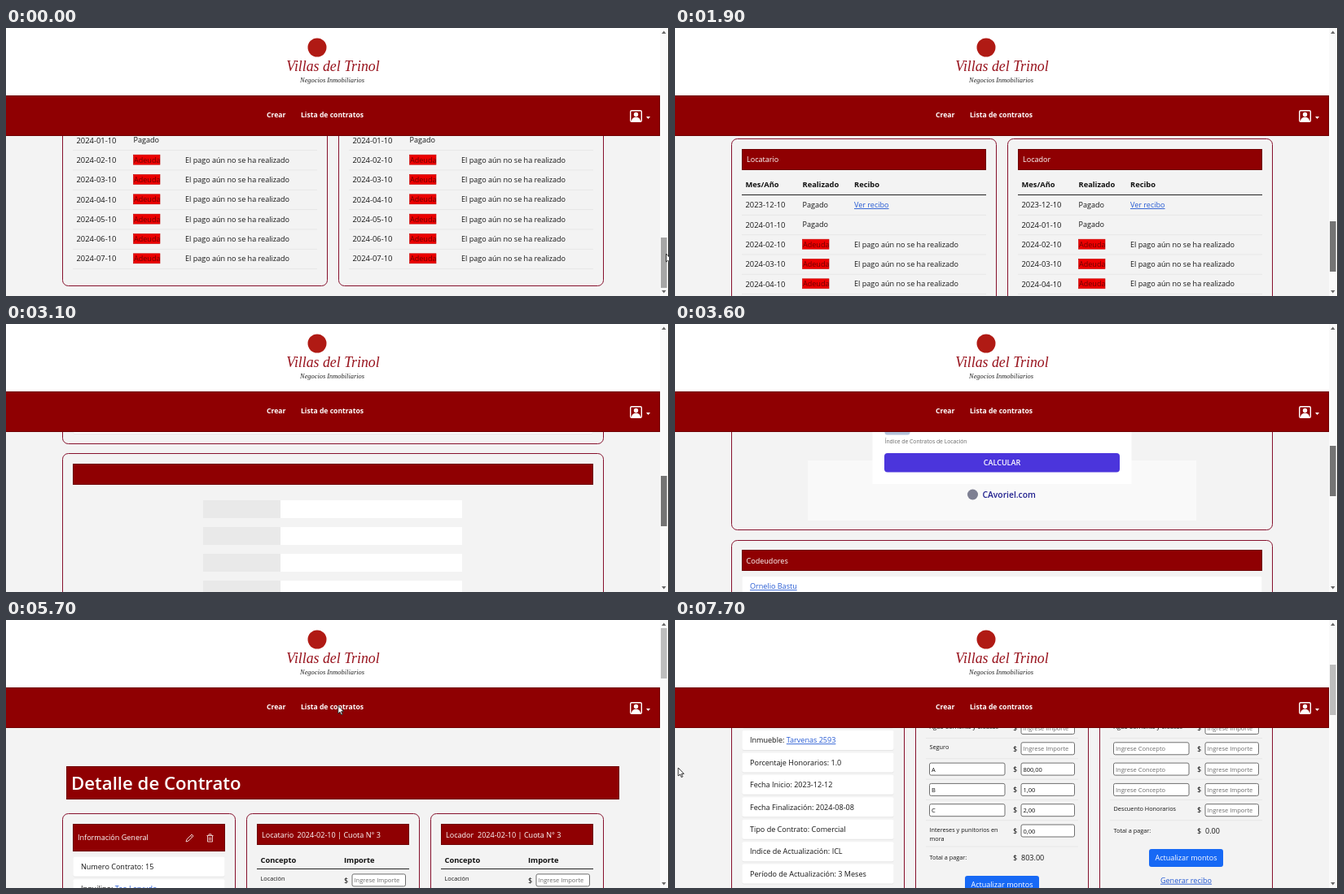
An HTML page that plays this animation: 814 by 330 pixels, repeating every 8 s.

```html
<!DOCTYPE html>
<html lang="es">
<head>
<meta charset="utf-8">
<title>Detalle de Contrato</title>
<style>
  html, body { margin: 0; width: 100%; height: 100%; overflow: hidden; background: #f3f3f3; }
  svg { display: block; font-family: "Open Sans", "Noto Sans", sans-serif; }
  .link { fill: #2459d3; text-decoration: underline; }
  .logo { font-family: "Liberation Serif", serif; font-style: italic; }
</style>
</head>
<body>
<svg id="stage" width="814" height="330" viewBox="0 0 814 330"></svg>
<script>
const RED = '#8f0002', INK = '#151515', BLUE = '#1769f5', GREY = '#6c6c6c';
const LOOP = 8000, STEP = 100, SCROLL_PER_THUMB_PX = 5.33;

// Drawing helpers; the y of a text is its visual middle.
const rect = (x, y, w, h, fill, extra = '') =>
  `<rect x="${x}" y="${y}" width="${w}" height="${h}" fill="${fill}" ${extra}/>`;
const text = (s, x, y, { size = 9.05, fill = INK, weight = 400, anchor = 'start', cls = '' } = {}) =>
  `<text x="${x}" y="${y + size * 0.36}" font-size="${size}" fill="${fill}" font-weight="${weight}" text-anchor="${anchor}" class="${cls}">${s}</text>`;
const white = (s, x, y, o = {}) => text(s, x, y, { fill: '#fff', ...o });
const link = (s, x, y, o = {}) => text(s, x, y, { cls: 'link', ...o });
const bold = (s, x, y) => text(s, x, y, { size: 9.3, weight: 700, fill: '#111' });
const small = (s, x, y) => text(s, x, y, { size: 7.3 });
const anchor = s => `<tspan class="link">${s}</tspan>`;
const card = (x, y, w, h) => rect(x, y, w, h, 'none', 'rx="7" stroke="#86102c"');
const bar = (x, y, w, h) => rect(x + 0.5, y + 0.5, w - 1, h - 1, RED, 'stroke="#6e0002"');
const rule = (x, y, w, fill = '#e7e7e7') => rect(x, y, w, 1, fill);
const item = (x, y, w) =>
  rect(x, y - 11, w, 24, '#e6e6e6', 'rx="2"') + rect(x, y - 12, w, 24, '#fff', 'rx="2"');

function field(x, y, w, value, hint) {
  return rect(x, y - 7.5, w, 15, '#fff', 'rx="2" stroke="#6f6f6f"') +
    text(value || hint, x + 2.5, y + 0.3, { size: 7.5, fill: value ? '#111' : GREY });
}

function infoCard() {
  const lines = [
    'Numero Contrato: 15',
    'Inquilino: ' + anchor('Teo Larvudo'),
    'Propietario: ' + anchor('Evaristo Molvez'),
    'Inmueble: ' + anchor('Tarvenas 2593'),
    'Porcentaje Honorarios: 1.0',
    'Fecha Inicio: 2023-12-12',
    'Fecha Finalización: 2024-08-08',
    'Tipo de Contrato: Comercial',
    'Indice de Actualización: ICL',
    'Período de Actualización: 3 Meses'
  ];
  const icons = `<g fill="none" stroke="#f3dede" stroke-width=".9">
    <path d="M221 273l1-3 6-6 2 2-6 6zM226.500 265.500l2 2"/>
    <path d="M246.500 265.500h8M249 265v-1.200h3V265M247.500 266v7h6v-7M249.500 267.500v4M251.500 267.500v4"/></g>`;
  return card(69.5, 238.5, 212, 380) + bar(82, 251, 187, 34) +
    white('Información General', 88, 268) + icons +
    lines.map((s, i) => {
      const y = 303.7 + i * 27.43;
      return item(82.5, y, 186) + text(s, 92, y);
    }).join('');
}

// A row is [label or null for an input, concept value, amount value].
function quotaCard(x, title, dateX, rows, totalY, total) {
  const conceptX = x + 17, dollarX = x + 119.5, amountX = x + 129.5;
  let out = card(x, 238.5, 212, 380) + bar(x + 12.5, 251, 187, 26) +
    white(title, x + 18.5, 264.3) + white('2024-02-10 | Cuota N° 3', dateX, 264.3) +
    bold('Concepto', conceptX, 295.3) + bold('Importe', dollarX, 295.3) +
    rule(x + 12.5, 306, 187, '#222');
  rows.forEach(([label, concept, amount], i) => {
    const y = 320.4 + i * 25.3;
    if (label) {
      label.split('\n').forEach((s, k) => out += small(s, conceptX, y - 1.6 + k * 11.5));
    } else {
      out += field(conceptX, y, 92.5, concept, 'Ingrese Concepto');
    }
    out += text('$', dollarX, y) + field(amountX, y, 65.5, amount, 'Ingrese Importe');
    out += rule(x + 12.5, y + (label && label.includes('\n') ? 19 : 12), 187);
  });
  const mid = x + 106;
  return out + small('Total a pagar:', conceptX, totalY) +
    text('$', dollarX, totalY) + text(total, amountX, totalY) +
    rect(mid - 45.5, totalY + 22.5, 91, 22, BLUE, 'rx="3"') +
    white('Actualizar montos', mid, totalY + 33.5, { anchor: 'middle' }) +
    link('Generar recibo', mid, totalY + 61, { anchor: 'middle' });
}

function calculator() {
  return card(69.5, 631.5, 664, 368) + bar(82, 644, 639, 26) +
    rect(163, 914, 477, 74, '#f9f9f9') + rect(242.5, 690, 318, 253, '#fff') +
    rect(257.5, 860, 31, 22.5, '#b3c2da', 'rx="3"') +
    text('Índice de Contratos de Locación', 257.5, 891, { size: 6.8, fill: '#666' }) +
    rect(257, 905, 289, 23.5, '#4b35dc', 'rx="4"') +
    white('CALCULAR', 401.5, 917, { weight: 600, anchor: 'middle' }) +
    '<circle cx="365.500" cy="956" r="6.500" fill="#7d7f92"/>' +
    text('CAvoriel.com', 377.5, 956, { size: 10.3, weight: 600, fill: '#20208f' });
}

function guarantors() {
  return card(69.5, 1012.5, 664, 81) + bar(82, 1024, 639, 26) +
    white('Codeudores', 87.5, 1037.5) + item(82.5, 1069, 638) +
    link('Ornelio Bastu', 92, 1069);
}

function saveForm() {
  let out = card(69.5, 1105.5, 664, 218) + bar(82, 1118, 639, 26);
  for (let y = 1163; y < 1280; y += 33) {
    out += rect(242, y, 95, 22, '#e9e9e9') + rect(337, y, 223, 22, '#fff');
  }
  return out + rect(337.5, 1290.5, 127.5, 17.5, BLUE, 'stroke="#1b4a9c"') +
    white('Guardar', 401.5, 1299.3, { anchor: 'middle' });
}

function payments(dx, title) {
  const dates = ['2023-12', '2024-01', '2024-02', '2024-03', '2024-04', '2024-05', '2024-06', '2024-07'];
  let out = card(69.5, 1352.5, 325, 285) + bar(82, 1365, 300, 26) +
    white(title, 88, 1378) + bold('Mes/Año', 86.5, 1409) + bold('Realizado', 156.5, 1409) +
    bold('Recibo', 220, 1409) + rule(82, 1421, 300, '#222');
  dates.forEach((month, i) => {
    const y = 1433.8 + i * 24.33;
    out += text(month + '-10', 86.5, y, { size: 9.4 }) + rule(82, y + 12, 300);
    if (i < 2) {
      out += text('Pagado', 156.5, y);
    } else {
      out += rect(156.5, y - 6.3, 32.5, 12, '#ec0000', 'stroke="#c40000" stroke-width=".6"') +
        text('Adeuda', 157, y, { fill: '#700000' }) +
        text('El pago aún no se ha realizado', 220, y);
    }
    if (i === 0) out += link('Ver recibo', 220, y);
  });
  return `<g transform="translate(${dx})">${out}</g>`;
}

function header() {
  return rect(0, 0, 803, 83, '#fff') + bar(-1, 83, 804, 50) +
    '<circle cx="382" cy="24" r="11.500" fill="#b01a14"/>' +
    text('Villas del Trinol', 401.5, 46.5, { size: 17.8, fill: '#98121c', anchor: 'middle', cls: 'logo' }) +
    text('Negocios Inmobiliarios', 400.5, 64.3, { size: 8.4, fill: '#222', anchor: 'middle', cls: 'logo' }) +
    white('Crear', 320, 106.8, { size: 8.6, weight: 700 }) +
    white('Lista de contratos', 362, 106.8, { size: 8.6, weight: 700 }) +
    `<rect x="766.700" y="101.700" width="13.600" height="13.600" rx="1.500" fill="none" stroke="#fff" stroke-width="1.400"/>
     <circle cx="773.500" cy="106.500" r="2.700" fill="#fff"/>
     <path d="M768 115c0-7 11-7 11 0zM786 109h5l-2.500 3z" fill="#fff"/>`;
}

const scrollbar = () => rect(803, 0, 11, 330, '#fafafa') +
  '<path d="M805 7l2.700-3.500 2.700 3.500zM805 323l2.700 3.500 2.700-3.500z" fill="#666"/>' +
  '<rect id="thumb" x="804" width="7.500" height="62"/>' + rect(813, 0, 1, 330, '#222');

const shared = [['Locación'], ['Tasa General de Inmuebles'], ['Agua Corriente y Cloacas']];
const tenantRows = [...shared, ['Seguro'], [null, 'A', '800,00'], [null, 'B', '1,00'], [null, 'C', '2,00'],
  ['Intereses y punitorios en\nmora', '', '0,00']];
const ownerRows = [...shared, [null], [null], [null], ['Descuento Honorarios']];

document.getElementById('stage').innerHTML =
  rect(0, 0, 814, 330, '#f3f3f3') +
  '<g id="page">' +
  bar(74, 180, 679, 41) +
  white('Detalle de Contrato', 80, 201.5, { size: 22.2, weight: 600 }) +
  infoCard() +
  quotaCard(295.5, 'Locatario', 357.5, tenantRows, 530.5, '803.00') +
  quotaCard(521.5, 'Locador', 579, ownerRows, 497.5, '0.00') +
  calculator() + guarantors() + saveForm() +
  payments(0, 'Locatario') + payments(339, 'Locador') +
  '</g>' + header() + scrollbar() +
  '<path id="cursor" d="M0 0v10l2.300-2 1.600 3.600 1.600-.7-1.600-3.500h3.100z" fill="#fff" stroke="#222" stroke-width=".9"/>';

// Each track is a list of [time, value]; values in between are linear.
const scrollTrack = [[800, 1320], [1100, 1295], [2600, 1146], [3600, 746], [4400, 314], [4700, 0],
  [6000, 0], [6200, 59], [6500, 118], [7100, 178], [7700, 238]];
const cursorX = [[1100, 810.5], [1500, 816], [5400, 816], [6000, -0.5], [6500, -0.5], [7200, 4]];
const cursorY = [[5400, 30], [6000, 180.5], [6500, 180.5], [7200, 182]];

function at(track, t) {
  const i = track.findIndex(([time]) => time > t);
  if (i === 0) return track[0][1];
  if (i < 0) return track[track.length - 1][1];
  const [[t0, a], [t1, b]] = [track[i - 1], track[i]];
  return a + (b - a) * (t - t0) / (t1 - t0);
}

const [page, thumb, cursor] = ['page', 'thumb', 'cursor'].map(id => document.getElementById(id));

function draw(now) {
  const t = Math.floor(now % LOOP / STEP) * STEP;
  const scroll = Math.round(at(scrollTrack, t));
  const thumbY = Math.round(10 + scroll / SCROLL_PER_THUMB_PX);
  const dragging = t >= 700 && t < 5300;
  page.setAttribute('transform', `translate(0 ${-scroll})`);
  thumb.setAttribute('y', thumbY);
  thumb.setAttribute('fill', dragging ? '#747474' : t < 700 ? '#a6a6a6' : '#bdbdbd');
  const y = t < 5400 ? thumbY + 20 : at(cursorY, t);
  cursor.setAttribute('transform', `translate(${at(cursorX, t)} ${y})`);
}

const start = performance.now();
function tick() {
  draw(performance.now() - start);
  requestAnimationFrame(tick);
}
tick();
</script>
</body>
</html>
```
